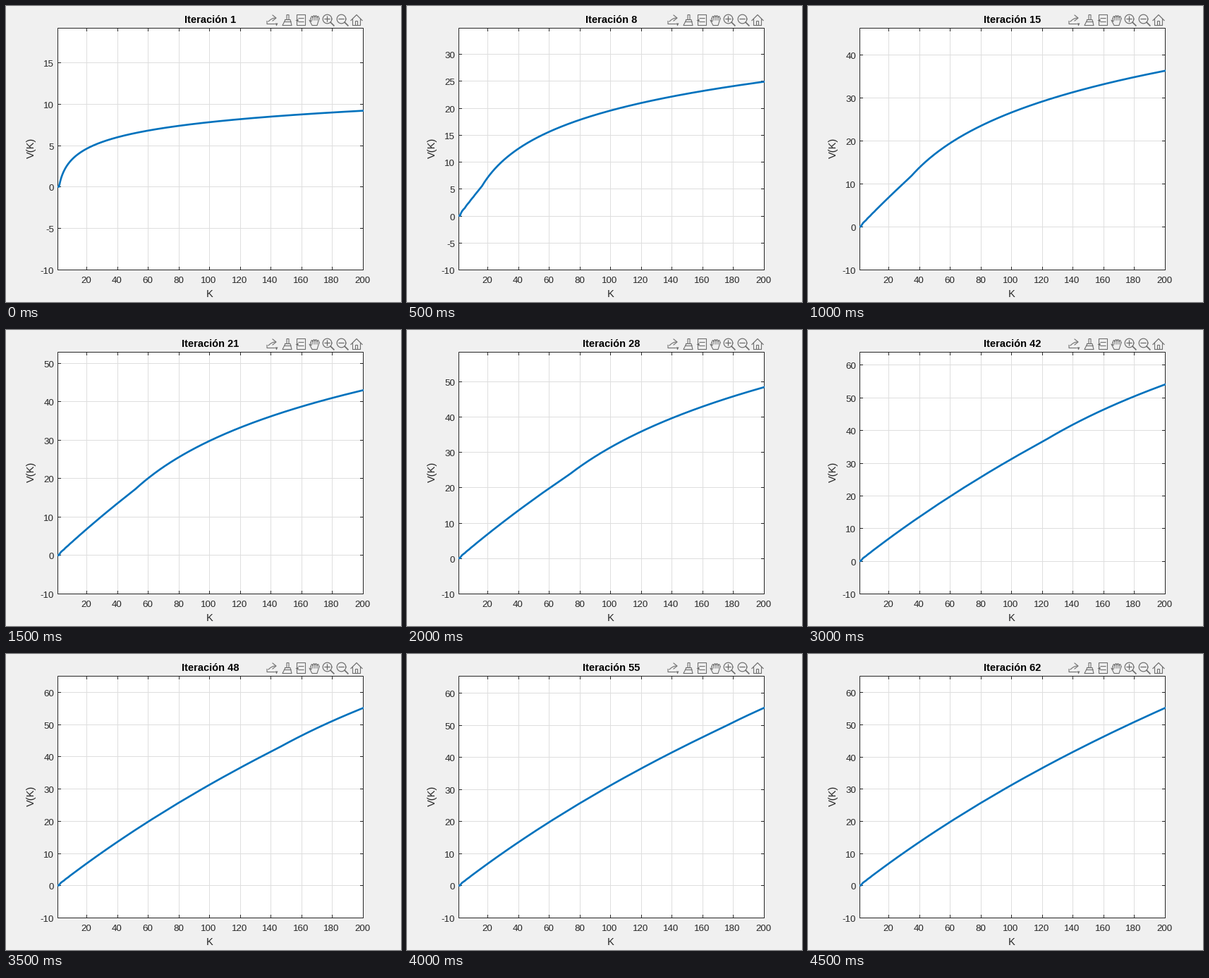
Write a matplotlib script that moves like this. It is 560 px wide and 420 px high and loops after 5 s.

```python
import numpy as np
import matplotlib.pyplot as plt
from matplotlib.animation import FuncAnimation
from matplotlib.collections import LineCollection
from matplotlib.patches import Rectangle

W, H, DPI = 560, 420, 100
PX = 72 / DPI  # points per pixel
LEFT, RIGHT, TOP, BOTTOM = 73.5, 506.5, 31.5, 374.5
DARK, GRID, BLUE, ICON = "#262626", "#dedede", "#0072bd", "#6e6e6e"
FRAMES, LAST = 10, 62
TICK = 4.5

plt.rcParams["font.family"] = "Liberation Sans"

# Cake-eating problem: V(K) = max over K' < K of ln(K - K') + BETA * V(K')
BETA = 0.99
K = np.arange(1, 200.1, 0.25)


def solve(count):
    eaten = K[:, None] - K
    utility = np.where(eaten > 0, np.log(np.maximum(eaten, 0.1)), -np.inf)
    values = [np.log(K)]
    while len(values) < count:
        best = (utility + BETA * values[-1]).max(axis=1)
        values.append(np.maximum(best, 0))
    return values


VALUES = solve(LAST)

fig = plt.figure(figsize=(W / DPI, H / DPI), dpi=DPI, facecolor="#f0f0f0")
ax = fig.add_axes([0, 0, 1, 1])
ax.set_xlim(0, W)
ax.set_ylim(H, 0)
ax.axis("off")


def mid(p):
    return np.floor(p) + 0.5


def x_px(k):
    return LEFT + (k - 1) / 199 * (RIGHT - LEFT)


def label(x, y, text, size=13.33, color=DARK, ha="center", va="baseline", **kw):
    return ax.text(x, y, text, fontsize=size * PX, color=color, ha=ha, va=va, **kw)


def segments(color, z):
    lines = LineCollection([], colors=color, linewidths=PX, zorder=z, snap=False)
    return ax.add_collection(lines, autolim=False)


def frame(z, **kw):
    ax.add_patch(Rectangle((LEFT, TOP), RIGHT - LEFT, BOTTOM - TOP,
                           lw=PX, zorder=z, snap=False, **kw))


# Toolbar icons, each drawn around its centre x
def stroke(xs, ys, width=1.1):
    ax.plot(xs, ys, color=ICON, lw=width * PX, snap=False, zorder=6)


def box(x, y, w, h):
    ax.add_patch(Rectangle((x, y), w, h, fc="none", ec=ICON, lw=1.1 * PX,
                           snap=False, zorder=6))


def arrow(x, y, shape):
    ax.plot(x, y, shape, color=ICON, ms=4 * PX, mew=0, zorder=6)


def export(x):
    t = np.linspace(0, 1, 20)
    stroke([x - 7, x - 7, x + 4], [21.5, 25.5, 25.5])
    stroke(x - 5 + 10 * t, 17 + 5 * (1 - t) ** 2)
    stroke([x + 1, x + 6, x + 1], [13, 17, 21])
    arrow(x + 5.5, 25.5, "v")


def brush(x):
    box(x + 1, 12.5, 3, 7)
    stroke([x - 1, x + 6, x + 8, x - 5, x - 1], [19.5, 19.5, 27.5, 27.5, 19.5])
    stroke([x - 2, x + 7], [22.5, 22.5])


def tip(x):
    box(x - 4.5, 12.5, 12, 15)
    for y in (17.5, 22.5):
        stroke([x - 2, x + 5], [y, y])
    arrow(x - 5, 20, "<")


def hand(x):
    t = np.linspace(0, 1, 80)
    tips = 16 - 2.5 * np.abs(np.sin(4 * np.pi * t)) + 2 * (2 * t - 1) ** 2
    stroke(x - 5 + 12 * t, tips)
    stroke([x - 5, x - 4, x - 7, x - 3, x + 4, x + 7], [18, 22, 20, 27.5, 27.5, 18])
    for gap in (-2, 1, 4):
        stroke([x + gap, x + gap], [16, 20])


def zoom(x, plus):
    t = np.linspace(0, 2 * np.pi, 60)
    cx, cy = x - 1.5, 18.5
    stroke(cx + 6.3 * np.cos(t), cy + 6.3 * np.sin(t), 1.2)
    stroke([cx - 3.5, cx + 3.5], [cy, cy], 1.3)
    if plus:
        stroke([cx, cx], [cy - 3.5, cy + 3.5], 1.3)
    stroke([cx + 4.6, cx + 9.3], [cy + 4.6, cy + 9.3], 1.7)


def home(x):
    stroke([x - 8, x, x + 8], [20.5, 12.5, 20.5], 1.2)
    stroke([x - 5.5, x - 5.5, x + 5.5, x + 5.5], [18.5, 27.5, 27.5, 18.5])
    box(x - 1.5, 21.5, 3, 6)


icons = [export, brush, tip, hand, lambda x: zoom(x, True),
         lambda x: zoom(x, False), home]
for n, icon in enumerate(icons):
    icon(377 + 20 * n)

# Fixed parts of the chart
frame(0, fc="white", ec="none")
frame(3, fc="none", ec=DARK)
x_grid, x_ticks = segments(GRID, 1), segments(DARK, 3)
marks_x = range(20, 201, 20)
cols = [mid(x_px(k)) for k in marks_x]
x_grid.set_segments([[(x, TOP), (x, BOTTOM)] for x in cols[:-1]])
x_ticks.set_segments([[(x, y), (x, y + d)] for x in cols
                      for y, d in ((TOP, TICK), (BOTTOM, -TICK))])
for k, x in zip(marks_x, cols):
    label(x - 1, 393, str(k))
label(289, 413, "K", 14.67)
label(35.5, 201.5, "V(K)", 14.67, va="center", rotation=90)

# Moving parts
title = label(289.7, 24, "", 14.67, "black", weight="bold")
y_grid, y_ticks = segments(GRID, 1), segments(DARK, 3)
y_labels = [label(68, 0, "", ha="right") for _ in range(10)]
curve, = ax.plot([], [], color=BLUE, lw=2.67 * PX, solid_joinstyle="round", zorder=4)
curve.set_clip_path(Rectangle((LEFT - 0.5, TOP - 0.5), RIGHT - LEFT + 1,
                              BOTTOM - TOP + 1, transform=ax.transData))


def update(i):
    step = round(1 + i * (LAST - 1) / (FRAMES - 1))
    v = VALUES[max(step, 2) - 1]
    high = v[-1] + 10
    scale = (BOTTOM - TOP) / (high + 10)

    def y_px(value):
        return BOTTOM - (value + 10) * scale

    title.set_text(f"Iteración {step}")
    curve.set_data(x_px(K) - 0.5, y_px(v) - 0.5)
    gap = 5 if high < 40 else 10
    marks = range(-10, int(high) + 1, gap)
    rows = [mid(y_px(m)) for m in marks]
    y_grid.set_segments([[(LEFT, y), (RIGHT, y)] for y in rows[1:]])
    y_ticks.set_segments([[(x, y), (x + d, y)] for y in rows
                          for x, d in ((LEFT, TICK), (RIGHT, -TICK))])
    for text in y_labels:
        text.set_visible(False)
    for text, mark, y in zip(y_labels, marks, rows):
        text.set(text=str(mark), y=y + 5.5, visible=True)
    return [title, curve, y_grid, y_ticks, *y_labels]


anim = FuncAnimation(fig, update, frames=FRAMES, interval=500,
                     init_func=lambda: update(0), repeat=True, repeat_delay=0)
plt.show()
```
